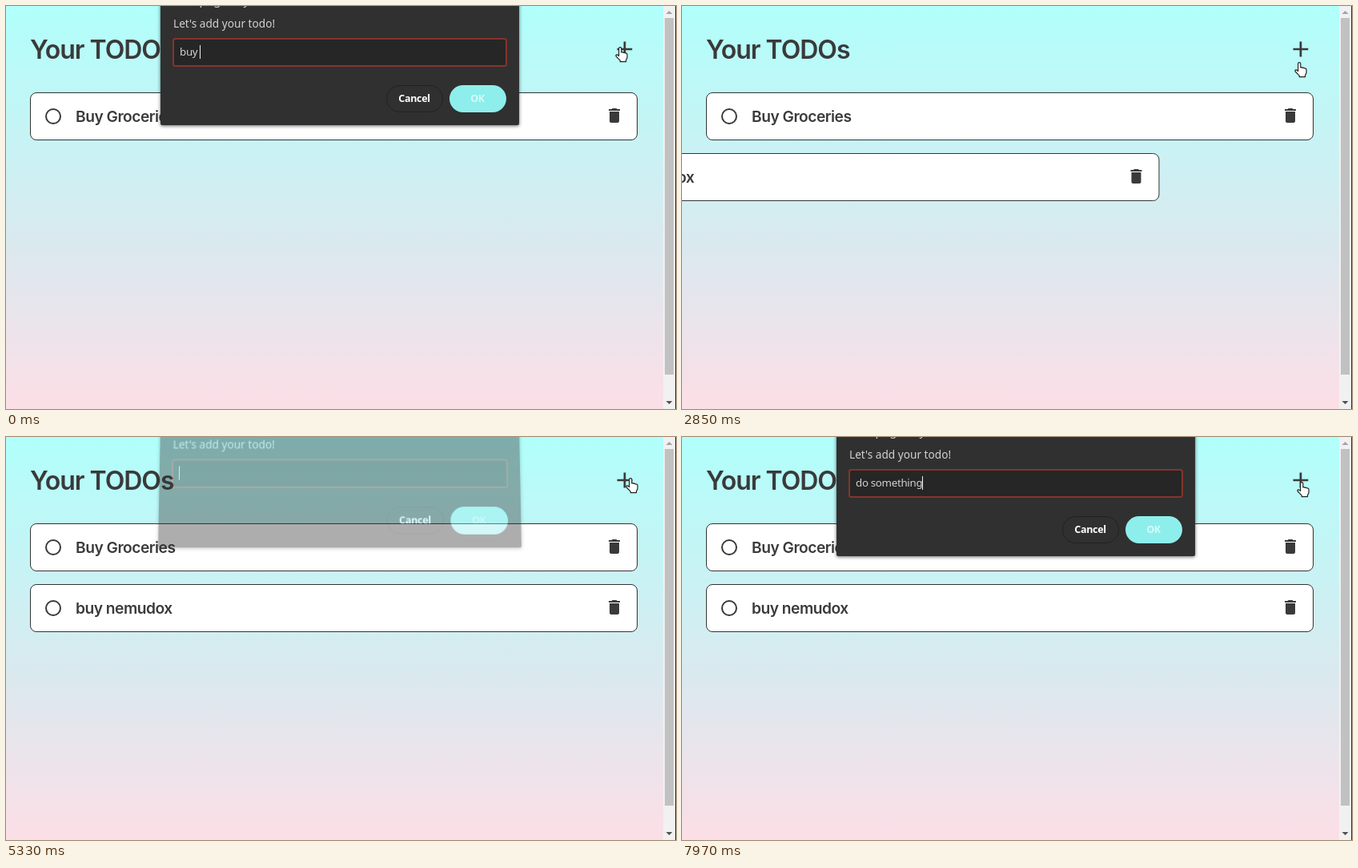
An HTML page for the animation above (8000 ms loop, 837x504 px).

```html
<!DOCTYPE html>
<html lang="en">
<head>
<meta charset="utf-8">
<title>Todo list</title>
<style>
  html, body { margin: 0; width: 100%; height: 100%; overflow: hidden; }
  svg { position: absolute; left: 0; top: 0; width: 837px; height: 504px; }
  #page { font: 600 19.2px Inter, sans-serif; letter-spacing: -.5px; fill: #3a3a3a; }
  #page .heading { font-size: 32px; letter-spacing: -1px; }
  .card { fill: #fff; stroke: #333; }
  .line { fill: none; stroke: #3a3a3a; }
  #dialog { position: absolute; left: 0; top: 0; width: 837px; height: 504px; transform-origin: 417px 0; }
  #dialog svg { font: 13.65px "Noto Sans", sans-serif; fill: #d2d2d2; }
  #dialog .title { font-size: 15px; font-weight: 500; }
  #dialog .button { font-size: 12.5px; font-weight: 600; letter-spacing: -.3px; text-anchor: middle; fill: #fff; }
  #typed { font-size: 13.3px; letter-spacing: -.3px; white-space: pre; }
  .panel { fill: #303030; filter: drop-shadow(0 1px 2px rgba(0, 0, 0, .6)); }
</style>
</head>
<body>
<svg id="page" viewBox="0 0 837 504">
  <defs>
    <linearGradient id="sky" x2="0" y2="1">
      <stop stop-color="#b0fffb"/>
      <stop offset=".6" stop-color="#dbe9ef"/>
      <stop offset=".97" stop-color="#fadfe7"/>
    </linearGradient>
    <g id="item">
      <rect class="card" x="30.5" y="108.5" width="758" height="59" rx="7.5"/>
      <circle class="line" cx="59" cy="138" r="9" stroke-width="2"/>
      <path transform="translate(748 125)" d="M6 19c0 1.1.9 2 2 2h8c1.1 0 2-.9 2-2V7H6zM19 4h-3.5l-1-1h-5l-1 1H5v2h14z"/>
    </g>
  </defs>
  <rect width="821" height="504" fill="url(#sky)"/>
  <text class="heading" x="30" y="66">Your TODOs</text>
  <path class="line" d="M763.5 54h18.8M772.9 44.6v18.8" stroke-width="2.7"/>
  <use href="#item"/>
  <text x="87" y="145">Buy Groceries</text>
  <g id="added">
    <use href="#item" y="76"/>
    <text x="87" y="221">buy nemudox</text>
  </g>
  <rect x="821" width="15" height="504" fill="#f1f1f1"/>
  <rect x="823" y="15" width="11" height="446" fill="#c1c1c1"/>
  <path d="M824.5 10l4-4 4 4z" fill="#a3a3a3"/>
  <path d="M824.5 494l4 4 4-4z" fill="#505050"/>
  <rect x="836" width="1" height="504" fill="#333"/>
</svg>

<div id="dialog">
  <svg viewBox="0 0 837 504">
    <path class="panel" d="M193-40H641V147q0 2-2 2H195q-2 0-2-2z"/>
    <text class="title" x="209" y="-2">This page says</text>
    <text x="209" y="27">Let's add your todo!</text>
    <rect id="field" fill="#262626"/>
    <text id="typed" x="217" y="62"></text>
    <rect id="caret" y="49" width="1" height="17" fill="#eee"/>
    <rect x="475.5" y="99.5" width="70" height="33" rx="16.5" fill="#303030" stroke="#222"/>
    <rect x="554" y="99" width="71" height="34" rx="17" fill="#8eeeec"/>
    <text class="button" x="510" y="120">Cancel</text>
    <text class="button" x="589" y="120" style="fill:#d4faf9">OK</text>
  </svg>
</div>

<svg viewBox="0 0 837 504">
  <g id="cursor" stroke-linejoin="round">
    <path id="hand" fill="#fff" stroke="#222" stroke-width="1.2"
      d="M4.6 11.5V2.2a1.6 1.6 0 0 1 3.2 0V7q1.2-.8 2.4.4 1.2-.6 2.3.5 2.4-.4 2.5 1.8v4l-1.5 3v2H6.2v-1.6L1.2 12q-.8-1.8.9-2.1 1.2 0 2.5 1.6z"/>
    <path id="arrow" fill="#222" stroke="#fff"
      d="M.5.5V15.5L4 12.4 6.4 17.6 8.9 16.5 6.5 11.5H11z"/>
  </g>
</svg>

<script>
const $ = id => document.getElementById(id);
const show = (element, visible) => element.style.display = visible ? '' : 'none';

// Each entry: [time, number of typed characters]
const first = { text: 'buy nemudox', keys: [[0, 4], [530, 7], [1220, 8], [1420, 9], [1600, 10], [1770, 11]] };
const second = {
  text: 'do something',
  keys: [[0, 0], [6530, 1], [6600, 2], [6720, 3], [6970, 4], [7070, 5], [7150, 6],
         [7350, 7], [7630, 8], [7680, 9], [7920, 11], [7970, 12]]
};
const dialogOpacity = [[0, 1], [2070, .4], [2200, 0], [5330, .4], [5380, .8], [5450, 1]];

// Pointer path: [time, x, y]
const pointer = [
  [0, 761, 51], [2849, 761, 51], [2850, 765, 70], [2930, 765, 70], [3050, 650, 190], [3180, 500, 268],
  [3300, 390, 279], [3450, 300, 250], [3630, 258, 205], [3680, 270, 215], [3820, 404, 265],
  [3960, 404, 265], [4150, 480, 235], [4400, 650, 110], [4680, 766, 22], [4790, 766, 22],
  [4800, 765, 20], [4960, 765, 20], [5050, 774, 51], [5499, 774, 51], [5530, 768, 56], [8000, 768, 56]
];

const held = (steps, t) => steps.filter(s => s[0] <= t).pop()[1];

function along(path, t) {
  const i = path.findIndex(p => p[0] > t);
  const [a, b] = [path[i - 1], path[i]];
  const k = (t - a[0]) / (b[0] - a[0]);
  return [a[1] + (b[1] - a[1]) * k, a[2] + (b[2] - a[2]) * k];
}

function drawDialog(t) {
  const opacity = held(dialogOpacity, t);
  show($('dialog'), opacity > 0);
  if (!opacity) return;
  const tilt = (1 - opacity) / .6;
  $('dialog').style.opacity = opacity;
  $('dialog').style.transform = tilt
    ? `translateY(${-12.6 * tilt}px) perspective(500px) rotateX(${2.5 * tilt}deg)` : 'none';

  const focused = t < 1970 || t >= 5330;
  const inset = focused ? 0 : .5;
  const box = {
    x: 209 + inset, y: 41 + inset, width: 416 - 2 * inset, height: 34 - 2 * inset, rx: 2.5,
    stroke: focused ? '#85342b' : '#202020', 'stroke-width': focused ? 2 : 1
  };
  for (const name in box) $('field').setAttribute(name, box[name]);

  const entry = t < 4000 ? first : second;
  const typed = $('typed');
  typed.textContent = entry.text.slice(0, held(entry.keys, t));
  $('caret').setAttribute('x', Math.round(217 + (typed.textContent ? typed.getComputedTextLength() : 0)));
  show($('caret'), focused && !(t >= 5770 && t < 6280));
}

function draw(t) {
  drawDialog(t);

  const left = 1 - Math.min(1, Math.max(0, (t - 2850) / 400));
  show($('added'), t >= 2850);
  $('added').setAttribute('transform', `translate(${-194 * left ** 3} 0)`);

  const pointing = t < 2940 || t >= 5000;
  show($('hand'), pointing);
  show($('arrow'), !pointing);
  $('cursor').setAttribute('transform', `translate(${along(pointer, t)})`);
}

const start = performance.now();
function tick() {
  draw((performance.now() - start) % 8000);
  requestAnimationFrame(tick);
}
tick();
</script>
</body>
</html>
```
